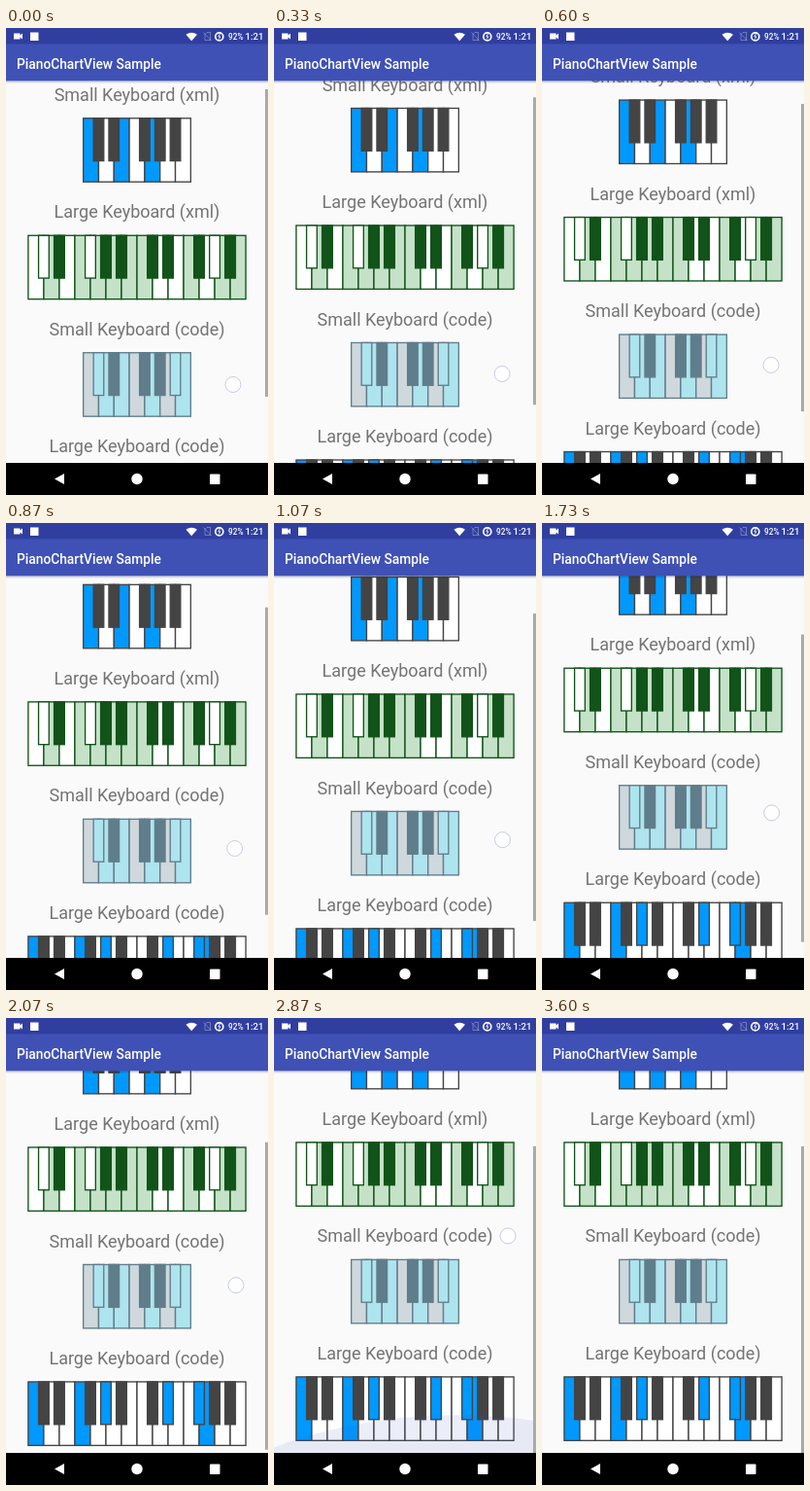
These frames come from a looping animation (270x480 px, 3.67 s). An HTML page:

```html
<!DOCTYPE html>
<html lang="en">
<head>
<meta charset="utf-8">
<title>PianoChartView Sample</title>
<style>
  html, body { margin: 0; width: 100%; height: 100%; overflow: hidden; background: #fafafa; }
  svg { display: block; width: 100vw; height: 100vh; }
  text { font-family: Roboto, sans-serif; }
  .heading { font-size: 18px; fill: #747474; text-anchor: middle; }
  .status { fill: #fff; font-weight: 500; }
</style>
</head>
<body>
<svg viewBox="0 0 270 480">
  <defs>
    <linearGradient id="shade" x2="0" y2="1">
      <stop stop-color="#000" stop-opacity=".2"/>
      <stop offset="1" stop-color="#000" stop-opacity="0"/>
    </linearGradient>
  </defs>
  <rect width="270" height="480" fill="#fafafa"/>
  <g id="content"></g>
  <ellipse id="glow" cx="188" rx="405" fill="#3f51b5"/>
  <rect id="thumb" x="267" width="3" height="316" fill="#aaa"/>

  <rect y="54.4" width="270" height="3" fill="url(#shade)"/>
  <rect width="270" height="54.4" fill="#3f51b5"/>
  <rect width="270" height="16.4" fill="#303f9f"/>
  <text x="11" y="42" font-size="13.75" font-weight="500" fill="#fff">PianoChartView Sample</text>

  <g fill="#fff">
    <path d="M8 5.5h6.5v2l2.500-2v6l-2.500-2v2H8z"/>
    <rect x="25" y="4.500" width="8.500" height="8.500"/>
    <path d="M185.500 6.700Q191.200 3 197 6.700L191.200 13.300z"/>
  </g>
  <g fill="none" stroke="#fff">
    <path d="M205 6.500l2-2h3.500v8h-5.500zM203.500 4.500l8 8.500" stroke-opacity=".3"/>
    <circle cx="219.800" cy="8.900" r="4" stroke-width="1.700"/>
    <path d="M220.500 6l-1.700 2.800h2l-1.500 2.700" stroke-width=".9"/>
  </g>
  <text class="status" x="229" y="12" font-size="8.25">92%</text>
  <text class="status" x="246.500" y="12.300" font-size="9.6">1:21</text>

  <rect y="447" width="270" height="33" fill="#000"/>
  <g fill="#fff">
    <path d="M50 463.500l10-5.500v11z"/>
    <circle cx="135" cy="463.500" r="5.700"/>
    <rect x="210" y="458.500" width="10.500" height="10.500" rx=".8"/>
  </g>
  <circle id="finger" r="8" fill="#fff" fill-opacity=".75" stroke="#c9cae6"/>
</svg>
<script>
const LOOP = 3670, ROW_GAP = 120.5, KEY_HEIGHT = 65.4, SHARP_HEIGHT = 43.8;
const SMALL = 110.7, LARGE = 224.2;
const el = id => document.getElementById(id);
const clamp01 = v => Math.min(1, Math.max(0, v));

const dark = "#444", blue = "#0099ff";
const classic = { line: dark, natural: "#fff", sharp: dark, checked: blue };
const green = { line: "#12531a", natural: "#c5e2c8", sharp: "#12531a", checked: "#fff" };
const slate = { line: "#607d8b", natural: "#cfd8dc", sharp: "#607d8b", checked: "#aee4ee" };

// In naturals and sharps, "x" marks a checked key.
const charts = [
  { title: "Small Keyboard (xml)", width: SMALL, colors: classic, naturals: "x.x.x..", sharps: "....." },
  { title: "Large Keyboard (xml)", width: LARGE, colors: green, naturals: "x.x.....xx.x..", sharps: "x.x.....x." },
  { title: "Small Keyboard (code)", width: SMALL, colors: slate, naturals: ".xx.x.x", sharps: "x...x" },
  { title: "Large Keyboard (code)", width: LARGE, colors: classic, naturals: "x..x.......x..", sharps: "...x..xx.." }
];

function keyboard({ title, width, colors, naturals, sharps }, row) {
  const top = 92.8 + row * ROW_GAP;
  const left = 135 - width / 2;
  const keyWidth = width / naturals.length;
  const sharpWidth = keyWidth * .67;
  const key = (x, w, h, fill) =>
    `<rect x="${x}" y="${top}" width="${w}" height="${h}" fill="${fill}"/>`;
  let whites = "", blacks = "", n = 0;
  [...naturals].forEach((mark, i) => {
    const x = left + i * keyWidth;
    whites += key(x, keyWidth, KEY_HEIGHT, mark === "x" ? colors.checked : colors.natural);
    if (i % 7 === 2 || i % 7 === 6) return;
    blacks += key(x + keyWidth - sharpWidth / 2, sharpWidth, SHARP_HEIGHT,
      sharps[n++] === "x" ? colors.checked : colors.sharp);
  });
  return `<text class="heading" x="135" y="${top - 17.9}">${title}</text>` +
    `<g stroke="${colors.line}" stroke-width="1.35">${whites}${blacks}</g>`;
}
el("content").innerHTML = charts.map(keyboard).join("");

// Linear interpolation through [time, value] points.
function track(points, t) {
  const i = points.findIndex(p => p[0] > t);
  if (i === 0) return points[0][1];
  if (i < 0) return points[points.length - 1][1];
  const [t0, v0] = points[i - 1], [t1, v1] = points[i];
  return v0 + (v1 - v0) * (t - t0) / (t1 - t0);
}
const scrollTrack = [[0, 0], [600, 18.7], [1070, 37.3], [1730, 64], [2070, 80.3], [2190, 85.4]];
const fingerX = [[0, 234], [600, 236], [1070, 235.5], [1730, 236.7], [2070, 237], [2870, 241]];
const fingerY = [[0, 366.5], [600, 346.5], [1070, 325.7], [1730, 298], [2070, 274.7], [2870, 224], [2960, 218.5]];
const glowScale = [[2190, 0], [2330, .45], [2600, .65], [2870, .72], [3250, .5], [3400, .35]];
const glowAlpha = [[2190, 0], [2800, .1], [2930, .1], [3400, 0]];

function setAttrs(node, attrs) {
  for (const name in attrs) node.setAttribute(name, attrs[name]);
}

function draw(t) {
  const scroll = track(scrollTrack, t);
  const scale = track(glowScale, t);
  el("content").setAttribute("transform", `translate(0 ${-scroll})`);
  el("thumb").setAttribute("y", 55 + .806 * (scroll + 9.9));
  setAttrs(el("glow"), { cy: 447 + 351 * scale, ry: 405 * scale, opacity: track(glowAlpha, t) });
  setAttrs(el("finger"), {
    cx: track(fingerX, t), cy: track(fingerY, t), opacity: clamp01((3000 - t) / 60)
  });
}

const start = performance.now();
function frame() {
  draw((performance.now() - start) % LOOP);
  requestAnimationFrame(frame);
}
frame();
</script>
</body>
</html>
```
